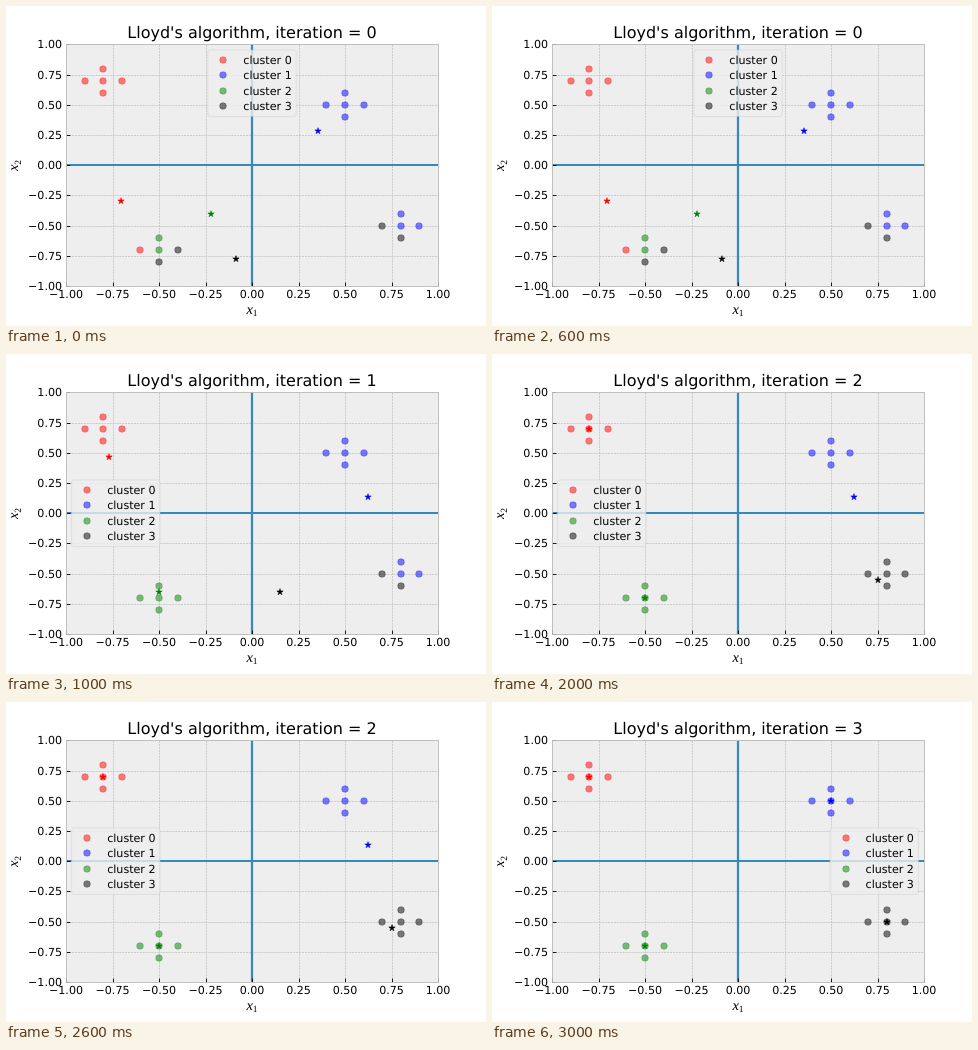
Write an HTML page that moves like this. It is 480 px wide and 320 px high and loops after 4000 ms.

```html
<!DOCTYPE html>
<html lang="en">
<head>
<meta charset="utf-8">
<title>Lloyd's algorithm</title>
<style>
html, body { margin: 0; width: 100%; height: 100%; overflow: hidden; background: #fff; }
svg { display: block; }
text { font: 11.11px "DejaVu Sans", sans-serif; text-rendering: geometricPrecision; }
.title { font-size: 16px; }
.math { font: italic 14.5px "Liberation Serif", "Times New Roman", serif; }
.sub { font-style: normal; font-size: 9.5px; }
.grid { stroke: #b2b2b2; stroke-width: .56; stroke-dasharray: 2.06 .89; }
.tick { stroke: #000; stroke-width: .89; }
.zero { stroke: #348abd; stroke-width: 2.22; }
.frame { fill: none; stroke: #bcbcbc; stroke-width: .89; }
.box { fill: #eee; stroke: #ccc; stroke-width: .56; opacity: .8; }
.dot { fill-opacity: .5; stroke-opacity: .5; stroke-width: .56; }
.star { stroke-width: .56; }
</style>
</head>
<body>
<svg id="stage" width="480" height="320" viewBox="0 0 480 320"></svg>
<script>
const L = 60, R = 432, T = 38.4, B = 280, STEP = 1000;
const colors = ['#f00', '#00f', '#008000', '#000'];
const legends = [[201.8, 43.9], [65.6, 125.9], [65.6, 125.9], [338, 125.9]];

const px = x => L + (x + 1) / 2 * (R - L);
const py = y => B - (y + 1) / 2 * (B - T);
const snap = v => Math.round(v) + .5;
const line = (cls, x1, y1, x2, y2) =>
  `<line class="${cls}" x1="${x1}" y1="${y1}" x2="${x2}" y2="${y2}"/>`;
const text = (s, x, y, anchor = 'start', cls = '') =>
  `<text class="${cls}" x="${x}" y="${y}" text-anchor="${anchor}">${s}</text>`;
const paint = k => `fill="${colors[k]}" stroke="${colors[k]}"`;
const dot = (x, y, k) => `<circle class="dot" cx="${x}" cy="${y}" r="3.33" ${paint(k)}/>`;

function star(x, y, k) {
  const pts = Array.from({ length: 10 }, (_, i) => {
    const r = i % 2 ? 1.27 : 3.33, a = i * Math.PI / 5;
    return `${x + r * Math.sin(a)},${y - r * Math.cos(a)}`;
  });
  return `<polygon class="star" points="${pts.join(' ')}" ${paint(k)} stroke-linejoin="bevel"/>`;
}

function axes() {
  let grid = '', ticks = '', labels = '';
  for (let i = -4; i <= 4; i++) {
    const v = i / 4, x = snap(px(v)), y = snap(py(v));
    const s = v.toFixed(2).replace('-', '\u2212');
    grid += line('grid', x, B, x, T) + line('grid', L, y, R, y);
    ticks += line('tick', x, B + .5, x, B - 3.4) + line('tick', L + .5, y, L + 4.4, y);
    labels += text(s, px(v), 292, 'middle') + text(s, 56.1, Math.round(py(v) + 4), 'end');
  }
  const name = n => `x<tspan class="sub" dy="2.5">${n}</tspan>`;
  labels += text(name(1), 246, 307.5, 'middle', 'math') +
    `<g transform="translate(12 159.5) rotate(-90)">${text(name(2), 0, 0, 'middle', 'math')}</g>`;
  return { grid, ticks, labels };
}

function legend([x, y]) {
  let s = `<rect class="box" x="${x}" y="${y}" width="88.4" height="66.5" rx="2.2"/>`;
  colors.forEach((_, k) => {
    const cy = y + 9.8 + k * 15.55;
    s += dot(Math.round(x + 15.55), Math.round(cy), k) +
      text('cluster ' + k, x + 35.55, Math.round(cy + 3.8));
  });
  return s;
}

const points = [[-.8, .7], [.5, .5], [-.5, -.7], [.8, -.5]].flatMap(([x, y]) =>
  [[0, 0], [.1, 0], [-.1, 0], [0, .1], [0, -.1]].map(([dx, dy]) => [x + dx, y + dy]));

function nearest([x, y], centers) {
  const d = centers.map(([a, b]) => (x - a) ** 2 + (y - b) ** 2);
  return d.indexOf(Math.min(...d));
}

const mean = (list, axis) => list.reduce((sum, p) => sum + p[axis], 0) / list.length;

const { grid, ticks, labels } = axes();
let centers = [[-.705, -.3], [.357, .28], [-.218, -.4], [-.085, -.78]];

const scenes = legends.map((place, n) => {
  const owner = points.map(p => nearest(p, centers));
  const at = (draw, [x, y], k) => draw(Math.round(px(x)), Math.round(py(y)), k);
  const dots = points.map((p, i) => at(dot, p, owner[i])).join('');
  const stars = centers.map((c, k) => at(star, c, k)).join('');
  centers = centers.map((_, k) => {
    const own = points.filter((_, i) => owner[i] === k);
    return [mean(own, 0), mean(own, 1)];
  });
  return `<rect x="${L}" y="${T}" width="${R - L}" height="${B - T}" fill="#eee"/>` +
    grid + dots + stars +
    line('zero', L, 159, R, 159) + line('zero', 246, T, 246, B) + ticks +
    `<rect class="frame" x="60.5" y="38.5" width="372" height="242"/>` + labels +
    text(`Lloyd's algorithm, iteration = ${n}`, 246, 32, 'middle', 'title') + legend(place);
});

const stage = document.getElementById('stage');
let shown = -1;
function tick() {
  const n = Math.floor(performance.now() / STEP) % scenes.length;
  if (n !== shown) stage.innerHTML = scenes[shown = n];
  requestAnimationFrame(tick);
}
tick();
</script>
</body>
</html>
```
